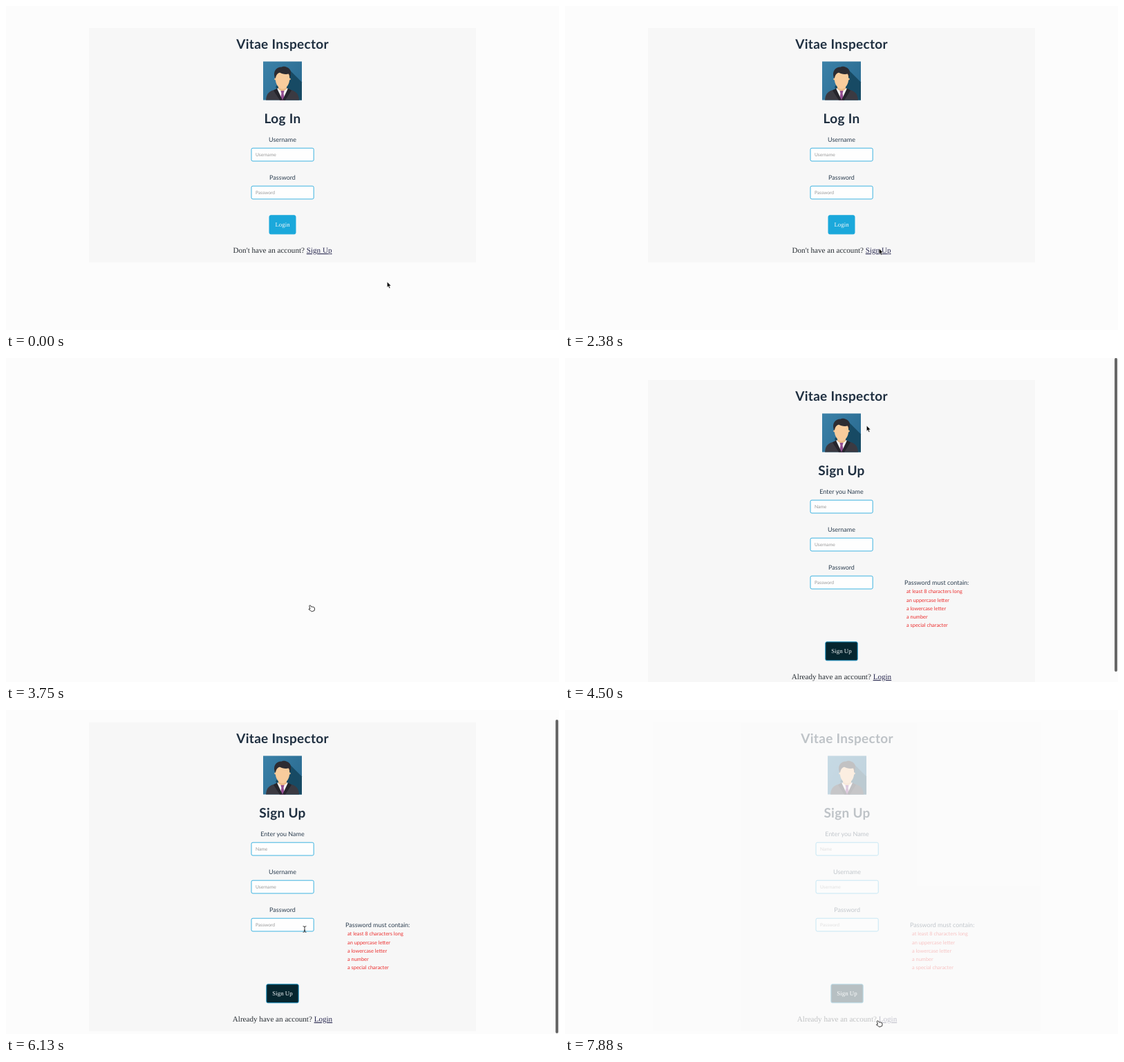
An HTML page that plays this animation: 800 px wide and 470 px high, repeating every 8000 ms.

```html
<!DOCTYPE html>
<html lang="en">
<head>
<meta charset="utf-8">
<title>Log in and sign up</title>
<style>
  html, body { margin: 0; width: 100%; height: 100%; overflow: hidden; background: #fcfcfc; }
  svg { display: block; width: 800px; height: 470px; }
  text { font: 9px Lato, sans-serif; fill: #2c3e50; text-anchor: middle; text-rendering: geometricPrecision; }
  .title { font-size: 19px; font-weight: 700; letter-spacing: .3px; fill: #1f2f40; }
  .hint { font-size: 6.7px; fill: #9a9a9a; text-anchor: start; }
  .rules { text-anchor: start; }
  .rule { font-size: 7.4px; fill: #ec2f2f; text-anchor: start; }
  .serif { font: 11.11px "Liberation Serif", serif; fill: #272d33; }
  .link { fill: #2b2b52; text-decoration: underline; text-decoration-color: #6b2a9b; }
  .button { font: 8.89px "Liberation Serif", serif; fill: #f4f8fa; }
  .field { fill: #fefefe; stroke: #3db2e0; }
</style>
</head>
<body>
<svg viewBox="0 0 800 470">
  <defs>
    <linearGradient id="sky" x2="1" y2=".6">
      <stop stop-color="#3b81a8"/><stop offset="1" stop-color="#2b6c92"/>
    </linearGradient>
    <g id="avatar">
      <path fill="url(#sky)" d="M0 0h56v56H0z"/>
      <path fill="#174a64" d="M37 11 56 30V56H30L18 37z"/>
      <path fill="#3b3a42" d="M4 56C5 46 8 43 20 40h16c12 3 15 6 16 16z"/>
      <path fill="#f7f5f3" d="M20 39h16l-1 6-7 11-7-11z"/>
      <path fill="#eab987" d="M22 33h12v7l-6 4-6-4z"/>
      <path fill="#954d91" d="M25.5 42.5h5l-1 4 2 9.5h-7l2-9.5z"/>
      <path fill="#25252c" d="m20 39-5 3 9 14h4zm16 0 5 3-9 14h-4z"/>
      <ellipse cx="28" cy="25.5" rx="12" ry="3.2" fill="#f2c08e"/>
      <path fill="#f9cc9c" d="M18 16h20v11c0 6-5 13-10 13s-10-7-10-13z"/>
      <path fill="#2d2c32" d="M17 24c-3-9 1-16 10-16 2-2 13 0 13 8 0 3-1 6-1 8l-2-6c-5 1-10 0-13-2-3 1-5 3-6 8z"/>
    </g>
  </defs>
  <g id="scroller">
    <g id="login"></g>
    <g id="signup"></g>
  </g>
  <rect id="scrollbar" x="795" width="4" height="455" rx="2" fill="#676767"/>
  <g id="pointer" stroke-linejoin="round">
    <path id="arrow" fill="#000" stroke="#fff" stroke-width=".6" d="M.3 0v8.2l1.8-1.7 1.3 3 1.5-.6-1.3-2.9h2.6z"/>
    <path id="beam" fill="none" stroke="#222" stroke-width=".9" d="M-2.4-4.3Q0-4.3 0-3 0-4.3 2.4-4.3M0-3.4V3.4M-2.4 4.3Q0 4.3 0 3 0 4.3 2.4 4.3M-1.1 1.5h2.2"/>
    <path id="hand" fill="#fff" stroke="#222" stroke-width=".9" d="M-1 .6Q0-.2.8.8l.9 1.7q3-.4 4.3.9 1.1 2 .1 4.6l-3.8 1.3q-1.6-1.4-4.4-3.2.2-1.3 2-.5L-1.1 1.7Q-1.4 1-1 .6z"/>
  </g>
</svg>
<script>
const el = id => document.getElementById(id);
const LOOP = 8000, FRAME = 125, SLIDE = 11.1;

const text = (cls, x, y, s) => `<text class="${cls}" x="${x}" y="${y}">${s}</text>`;

const field = (y, label, hint) =>
  text('label', 400, y - 9, label) +
  `<rect class="field" x="355" y="${y + .2}" width="90.2" height="18.8" rx="2"/>` +
  text('hint', 361, y + 12.1, hint);

const button = (y, width, label, fill, stroke) =>
  `<rect x="${400 - width / 2}" y="${y}" width="${width}" height="27" rx="2" fill="${fill}" stroke="${stroke}"/>` +
  text('button', 400, y + 16.6, label);

const card = (height, heading, body, footY, question, link) =>
  `<rect x="120" y="32" width="560" height="${height}" fill="#f7f7f7"/>` +
  text('title', 400, 62.3, 'Vitae Inspector') +
  '<use href="#avatar" x="372" y="80.5"/>' +
  text('title', 400, 169.5, heading) + body +
  text('serif', 400, footY, `${question} <tspan class="link">${link}</tspan>`);

const rules = ['at least 8 characters long', 'an uppercase letter', 'a lowercase letter',
  'a number', 'a special character'];

el('login').innerHTML = card(340, 'Log In',
  field(206, 'Username', 'Username') + field(261, 'Password', 'Password') +
  button(303.8, 38, 'Login', '#1ba8db', '#1ba8db'),
  358, "Don't have an account?", 'Sign Up');

el('signup').innerHTML = card(448, 'Sign Up',
  field(206, 'Enter you Name', 'Name') + field(261, 'Username', 'Username') +
  field(316, 'Password', 'Password') +
  text('rules', 491, 329, 'Password must contain:') +
  rules.map((r, i) => text('rule', 494, 341.3 + i * 12.25, r)).join('') +
  button(411.8, 46.4, 'Sign Up', '#06262f', '#1b93c4'),
  466, 'Already have an account?', 'Login');

const clamp = v => Math.min(1, Math.max(0, v));
const smooth = v => v * v * (3 - 2 * v);

const bezier = (x1, y1, x2, y2) => v => {
  const at = (a, b, u) => 3 * (1 - u) ** 2 * u * a + 3 * (1 - u) * u * u * b + u ** 3;
  let lo = 0, hi = 1;
  for (let i = 0; i < 24; i++) {
    const mid = (lo + hi) / 2;
    if (at(x1, x2, mid) < v) lo = mid; else hi = mid;
  }
  return at(y1, y2, lo);
};
const leaveEase = bezier(1, .5, .8, 1);
const enterEase = bezier(.25, .1, .25, 1);
const leave = (t, start) => leaveEase(clamp((t - start) / 800));
const enter = (t, start) => 1 - enterEase(clamp((t - start) / 300));

// time, x, y, pointer shape from then on
const pointerKeys = [
  [0, 551, 400, 'arrow'], [400, 551, 400, 'arrow'],
  [1250, 392, 155, 'beam'], [1400, 392, 155, 'arrow'],
  [1750, 430, 215, 'arrow'], [2000, 508, 290, 'arrow'], [2250, 468, 345, 'arrow'],
  [2500, 440, 358.5, 'hand'], [4050, 440, 358.5, 'arrow'],
  [4500, 436, 98, 'arrow'], [5000, 436, 98, 'arrow'],
  [5875, 432, 318, 'beam'], [6400, 432, 318, 'arrow'],
  [7000, 452.5, 450.5, 'hand'], [LOOP, 452.5, 450.5, 'hand']
];

function placePointer(t) {
  const i = pointerKeys.findIndex(k => k[0] > t);
  const [t0, x0, y0, shape] = pointerKeys[i - 1];
  const [t1, x1, y1] = pointerKeys[i];
  const p = smooth((t - t0) / (t1 - t0));
  el('pointer').setAttribute('transform', `translate(${x0 + (x1 - x0) * p} ${y0 + (y1 - y0) * p})`);
  for (const id of ['arrow', 'beam', 'hand']) el(id).style.display = id === shape ? '' : 'none';
}

function placePage(id, hidden) {
  el(id).setAttribute('transform', `translate(${SLIDE * hidden} 0)`);
  el(id).setAttribute('opacity', 1 - hidden);
}

function draw(now) {
  const t = Math.floor(now % LOOP / FRAME) * FRAME;
  const scroll = 14 * smooth(clamp((t - 4500) / 375));
  placePage('login', leave(t, 2920));
  placePage('signup', t < 7000 ? enter(t, 3750) : leave(t, 7220));
  el('scroller').setAttribute('transform', `translate(0 ${-scroll})`);
  el('scrollbar').setAttribute('y', scroll);
  el('scrollbar').setAttribute('opacity', t < 4125 ? 0 : 1 - clamp((t - 7250) / 250));
  placePointer(t);
  requestAnimationFrame(draw);
}
requestAnimationFrame(draw);
</script>
</body>
</html>
```
